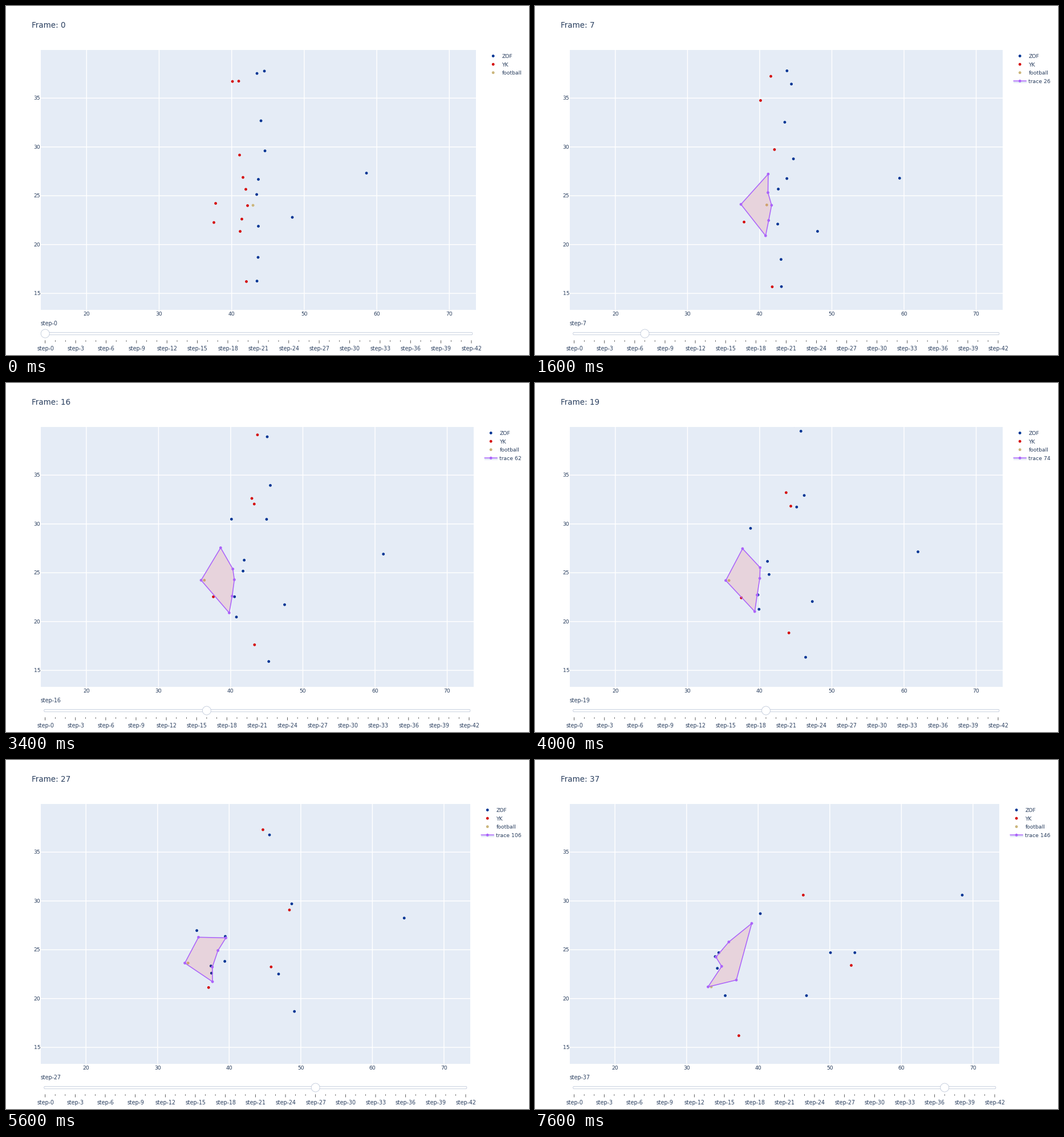
A matplotlib script for the animation above (7800 ms loop, 917 by 611 pixels).

```python
import numpy as np
import matplotlib.pyplot as plt
from matplotlib.animation import FuncAnimation
from matplotlib.patches import Circle, FancyBboxPatch, Polygon, Rectangle

W, H, DPI = 917, 611, 64
STEPS, LAST = 42, 37
BLUE, RED, TAN, VIOLET = "#003594", "#D50A0A", "#CBB67C", "#AB63FA"
INK, PANEL, BORDER = "#2A3F5F", "#E5ECF6", "#BEC8D9"
LEFT, TOP, BOTTOM = 61, 76.5, 531.5

# Each player runs a smooth curve through a few stops, evenly spaced in
# time. A stop is one complex number: yards across + yards up.
DEFENCE = [
    [43.49+37.53j, 45.6+39.4j, 52+45j],
    [44.51+37.77j, 46.05+33.1j, 53.5+24.7j],
    [44.59+29.6j, 45.1+31.5j, 46.5+46.5j],
    [58.58+27.32j, 61.8+27.1j, 68.5+30.6j],
    [43.49+16.26j, 44.1+15.65j, 48.4+17.8j, 50.1+24.7j],
    [44.04+32.68j, 41.7+31.5j, 36.3+27.7j, 34.5+24.7j],
    [43.68+26.68j, 42.8+26.5j, 39.8+26.2j, 40.3+28.7j],
    [43.45+25.13j, 42.1+25.5j, 40.1+24.1j, 34.3+23.1j],
    [48.36+22.79j, 47.7+21.4j, 47+22.5j, 46.75+20.3j],
    [43.68+21.88j, 39.9+22.7j, 34+24.3j],
    [43.64+18.69j, 41.8+19.5j, 38.2+22.4j, 35.4+20.3j],
]
RUNNERS = [
    [40.97+36.74j, 44.6+39.9j, 55+49j],
    [40.11+36.71j, 41.5+33.5j, 47.2+30j, 53+23.4j],
    [41.09+29.17j, 43.6+33j, 46+44.4j],
    [37.55+22.26j, 37.75+22.5j, 37.2+21.7j, 37.3+16.2j],
    [42.03+16.21j, 42.5+16.5j, 45.4+21.8j, 46.3+30.6j],
]
PASSER = [37.79+24.22j, 36.6+24.2j, 34.2+23.9j, 33+21.2j]
BLOCKERS = [
    [41.56+26.88j, 39.8+27.5j, 36.1+26.8j, 36.95+21.9j],
    [41.95+25.66j, 40.1+25.5j, 39.1+27.7j],
    [42.19+23.99j, 40.1+24.4j, 35.9+25.8j],
    [41.4+22.61j, 39.75+22.7j, 34.1+24.25j],
    [41.17+21.35j, 39.4+21j, 34.9+23.3j],
]
SNAP, CATCH, BALL = 2, 15, 42.94+24.02j


def along(n, stops):
    keys = np.linspace(0, LAST, len(stops))
    return np.polyval(np.polyfit(keys, stops, len(stops) - 1), n)


def ball_at(n):
    """The ball travels from the line of play to the passer's hand."""
    t = np.clip((n - SNAP) / (CATCH - SNAP), 0, 1)
    return BALL + (along(n, PASSER) + 0.45 - BALL) * t


def pt(px):
    return px * 72 / DPI


def to_y(yard):
    return 503.1 - (yard - 15) * 17.09


def right_edge(trace):
    """The panel shrinks as the legend label grows."""
    if trace < 10:
        return 824
    return 820 if trace < 100 else 814


fig = plt.figure(figsize=(W / DPI, H / DPI), dpi=DPI, facecolor="white")
ax = fig.add_axes([0, 0, 1, 1])


def text(x, y, s, size=9.3, ha="left"):
    ax.text(x, y, s, fontsize=pt(size), ha=ha, va="baseline",
            color=INK, family="DejaVu Sans")


def line(xs, ys, color, width, z):
    ax.plot(xs, ys, color=color, lw=pt(width), zorder=z, snap=False,
            solid_capstyle="butt")


def dots(points, colors, z):
    xs, ys = zip(*points)
    return ax.scatter(xs, ys, s=pt(4.8) ** 2, c=colors, linewidths=0, zorder=z)


def draw_panel(right, to_x):
    panel = Rectangle((LEFT, TOP), right - LEFT, BOTTOM - TOP, fc=PANEL, lw=0)
    ax.add_patch(panel)
    for v in range(20, 80, 10):
        line([to_x(v)] * 2, [TOP, BOTTOM], "white", 1.5, 2)
        text(to_x(v), 542, str(v), ha="center")
    for v in range(15, 40, 5):
        line([LEFT, right], [to_y(v)] * 2, "white", 1.5, 2)
        text(60.3, to_y(v) + 3.2, str(v), ha="right")
    return panel


def draw_players(n, panel, to_x):
    def pixels(paths):
        spots = [along(n, p) for p in paths]
        return [(to_x(s.real), to_y(s.imag)) for s in spots]

    blues, reds = pixels(DEFENCE), pixels(RUNNERS)
    pocket = pixels([PASSER] + BLOCKERS)
    ball = ball_at(n)
    if n == 0:
        reds += pocket
    spots = blues + reds + [(to_x(ball.real), to_y(ball.imag))]
    colors = [BLUE] * len(blues) + [RED] * len(reds) + [TAN]
    dots(spots, colors, 3).set_clip_path(panel)
    if n > 0:
        # The pocket hides the grid and tints the dots inside it.
        ax.add_patch(Polygon(pocket, fc=PANEL, lw=0, zorder=2.5))
        ax.add_patch(Polygon(pocket, fc=(1, 0, 0, 0.1), lw=0, zorder=4))
        xs, ys = zip(*pocket, pocket[0])
        line(xs, ys, VIOLET, 1.55, 5)
        dots(pocket, [VIOLET] * len(pocket), 6)


def draw_legend(n, right, trace):
    mark, label = right + 30.2, right + 45.4
    rows = [("ZOF", BLUE), ("YK", RED), ("football", TAN)]
    if n > 0:
        rows.append((f"trace {trace}", VIOLET))
        ax.add_patch(Rectangle((mark - 11.6, 131.2), 23.2, 4, fc="#E3E9F5", lw=0))
        line([mark - 11.6, mark + 11.6], [131.2] * 2, VIOLET, 1.55, 3)
    ys = [87.5 + 14.6 * i for i in range(len(rows))]
    dots([(mark, y) for y in ys], [c for _, c in rows], 4)
    for (name, _), y in zip(rows, ys):
        text(label, y + 3.4, name)


def draw_slider(n, right):
    def stop(i):
        return 68.7 + i / STEPS * (right - 76.7)

    ax.add_patch(FancyBboxPatch(
        (66.8, 571.4), right - 73, 4.3, fc="white", ec=BORDER, lw=pt(0.8),
        boxstyle="round,pad=0,rounding_size=1.6", zorder=2))
    ax.add_patch(Circle((stop(n), 573.5), 7.5, fc="white", ec=BORDER,
                        lw=pt(0.8), zorder=3))
    for i in range(STEPS + 1):
        major = i % 3 == 0
        line([stop(i)] * 2, [585.3, 590.5 if major else 587.7], "#333333", 0.8, 2)
        if major:
            text(stop(i) + 0.3, 602.8, f"step-{i}", 9.5, "center")
    text(60.7, 559.2, f"step-{n}", 9.5)


def draw(k):
    n = max(0, k - 1)
    trace = 4 * n - 2
    right = right_edge(trace)

    def to_x(yard):
        return LEFT + (yard - 13.69) * (right - LEFT) / 59.98

    ax.clear()
    ax.set(xlim=(0, W), ylim=(H, 0))
    ax.axis("off")
    panel = draw_panel(right, to_x)
    draw_players(n, panel, to_x)
    draw_legend(n, right, trace)
    draw_slider(n, right)
    text(45, 38.4, f"Frame: {n}", 13.5)
    return []


anim = FuncAnimation(fig, draw, frames=LAST + 2, interval=200,
                     repeat=True, repeat_delay=0)
plt.show()
```
